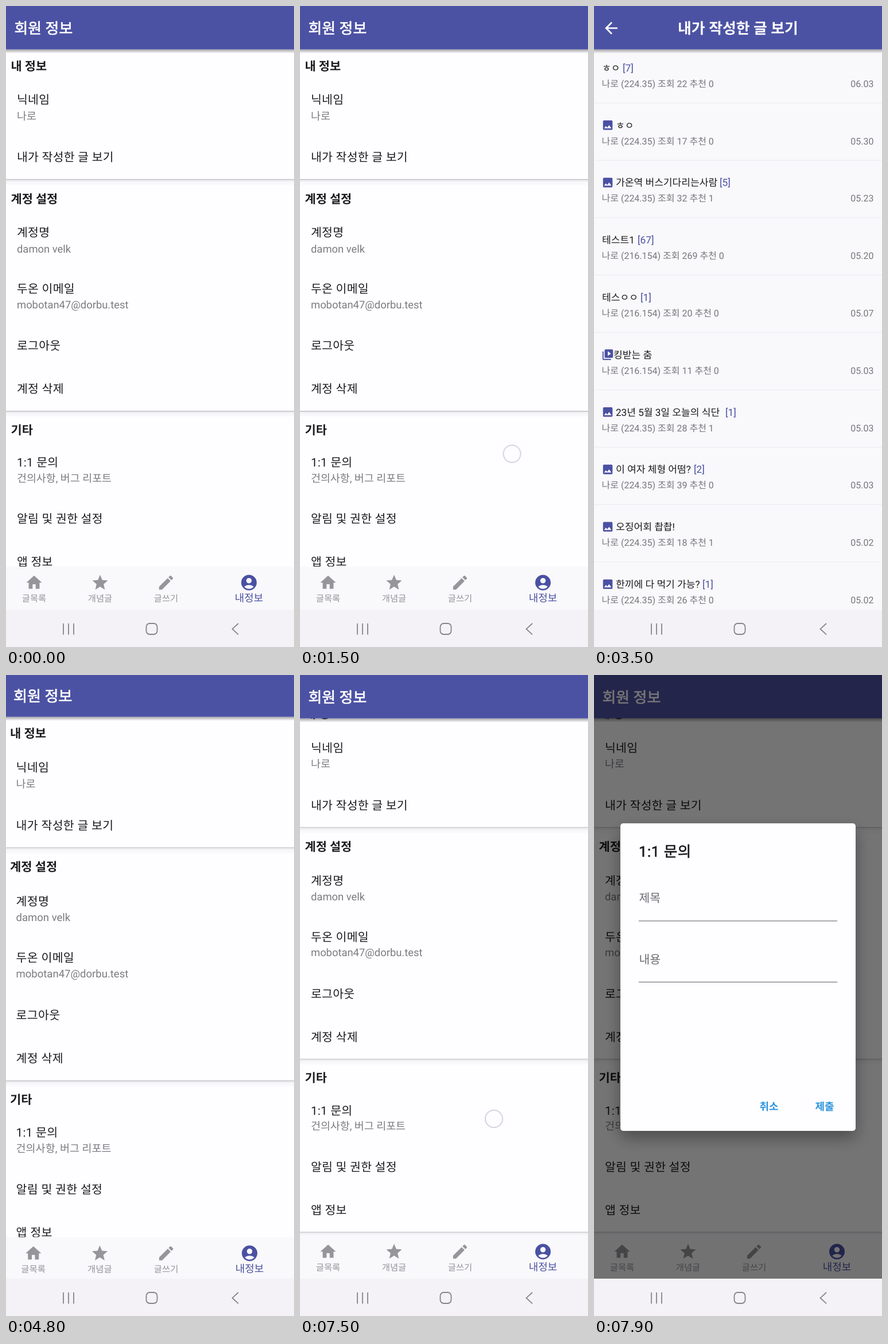
These frames come from a looping animation (502 px wide and 1115 px high, 8000 ms). An HTML page:

```html
<!DOCTYPE html>
<html lang="ko">
<head>
<meta charset="utf-8">
<title>회원 정보</title>
<style>
html, body { margin: 0; width: 100%; height: 100%; overflow: hidden; background: #f4f2f6; }
svg { display: block; width: 502px; height: 1115px; }
text { font-family: Roboto, "Noto Sans CJK KR", "Noto Sans CJK", sans-serif; fill: #1b1b1e; white-space: pre; text-rendering: geometricPrecision; }
.h { font-weight: 700; font-size: 20.8px; }
.t { font-size: 20.45px; letter-spacing: .3px; }
.s { font-size: 18.4px; fill: #7c7b80; }
.bar { font-size: 25.9px; fill: #fff; stroke: #fff; stroke-width: .7px; }
.row { font-size: 17.1px; }
.meta { font-size: 16px; fill: #77767b; }
.cnt { font-size: 17.3px; fill: #4a51a2; }
.tab { font-size: 15.4px; fill: #96959a; }
.on { font-size: 17.9px; fill: #4a51a2; }
.dt { font-size: 25.6px; letter-spacing: .6px; stroke: #1b1b1e; stroke-width: .6px; }
.lab { font-size: 20.4px; fill: #6b6b70; }
.btn { font-size: 17.9px; font-weight: 700; fill: #2b93dd; }
.bold { font-weight: 700; stroke: none; }
.mid { text-anchor: middle; }
.end { text-anchor: end; }

#home, #posts { transform-origin: 251px 525px; }
#list { animation: scroll 8s linear infinite; }
#home { animation: under 8s linear infinite; }
#posts { animation: fade 8s linear infinite, zoom 8s linear infinite; }
#dialog { animation: dialog 8s linear infinite; }
#touch { animation: show 8s step-end infinite, move 8s linear infinite; }

@keyframes scroll {
  0%, 9.75% { transform: translateY(0); }
  11.25% { transform: translateY(-32px); }
  12.5%, 15% { transform: translateY(-36.5px); }
  18.75%, 71.25% { transform: translateY(0); }
  75%, 100% { transform: translateY(-36.5px); }
}
@keyframes under {
  0%, 33.625% { transform: scale(1); }
  34.25% { transform: scale(1.02); animation-timing-function: cubic-bezier(.208, .82, .25, 1); }
  37.375%, 58.12% { transform: scale(1.05); }
  58.125% { transform: scale(1.1); }
  58.75% { transform: scale(1.06); animation-timing-function: cubic-bezier(.208, .82, .25, 1); }
  61.875%, 100% { transform: scale(1); }
}
@keyframes zoom {
  0%, 33.625% { transform: scale(.85); }
  34.25% { transform: scale(.91); animation-timing-function: cubic-bezier(.208, .82, .25, 1); }
  37.375%, 58.125% { transform: scale(1); }
  58.75% { transform: scale(.96); animation-timing-function: cubic-bezier(.208, .82, .25, 1); }
  61.875%, 100% { transform: scale(.9); }
}
@keyframes fade {
  0%, 34.09% { opacity: 0; }
  34.56%, 58.44% { opacity: 1; }
  58.91%, 100% { opacity: 0; }
}
@keyframes dialog {
  0%, 95.625% { opacity: 0; }
  98.125%, 100% { opacity: 1; }
}
@keyframes show {
  0% { opacity: 0; }
  7.5% { opacity: 1; }
  20% { opacity: 0; }
  30% { opacity: 1; }
  33.75% { opacity: 0; }
  55% { opacity: 1; }
  58.75% { opacity: 0; }
  70% { opacity: 1; }
  81.25% { opacity: 0; }
  93.75% { opacity: 1; }
  96.25%, 100% { opacity: 0; }
}
@keyframes move {
  0%, 7.5% { transform: translate(352px, 818px); }
  10% { transform: translate(352px, 805px); }
  11.25% { transform: translate(357px, 767px); }
  12.5% { transform: translate(360px, 730px); }
  15% { transform: translate(362px, 715px); }
  20% { transform: translate(372px, 800px); }
  20.1%, 40% { transform: translate(392px, 263px); }
  40.1%, 65% { transform: translate(30px, 39px); }
  65.1%, 70% { transform: translate(380px, 720px); }
  76.25%, 85% { transform: translate(387px, 599px); }
  85.1%, 100% { transform: translate(338px, 772px); }
}
</style>
</head>
<body>
<svg id="stage" viewBox="0 0 502 1115"></svg>
<script>
const ACCENT = '#4a51a2', GREY = '#96959a', PAPER = '#f9f8fb', CARD = '#fefdff';

const ICONS = {
  home: 'M10 20v-6h4v6h5v-8h3L12 3 2 12h3v8z',
  star: 'M12 17.27L18.18 21l-1.64-7.03L22 9.24l-7.19-.61L12 2 9.19 8.63 2 9.24l5.46 4.73L5.82 21z',
  pen: 'M3 17.25V21h3.75L17.81 9.94l-3.75-3.75zM20.71 7.04a1 1 0 0 0 0-1.41l-2.34-2.34a1 1 0 0 0-1.41 0l-1.83 1.83 3.75 3.75z',
  user: 'M12 2a10 10 0 1 0 0 20a10 10 0 1 0 0-20zm0 4a3.5 3.5 0 1 1 0 7a3.5 3.5 0 1 1 0-7zm0 14c-2.03 0-4.43-.82-6.14-2.88a9.95 9.95 0 0 1 12.28 0C16.43 19.18 14.03 20 12 20z',
  image: 'M21 19V5a2 2 0 0 0-2-2H5a2 2 0 0 0-2 2v14a2 2 0 0 0 2 2h14a2 2 0 0 0 2-2zM8.5 13.5l2.5 3.01L14.5 12l4.5 6H5z',
  video: 'M4 6H2v14a2 2 0 0 0 2 2h14v-2H4zm16-4H8a2 2 0 0 0-2 2v12a2 2 0 0 0 2 2h12a2 2 0 0 0 2-2V4a2 2 0 0 0-2-2zm-8 12.5v-9l6 4.5z',
  back: 'M20 11H7.83l5.59-5.59L12 4l-8 8 8 8 1.41-1.41L7.83 13H20z'
};

const SIZE = { h: 20.8, t: 20.45, s: 18.4, bar: 25.9, row: 17.1, meta: 16, cnt: 17.3, tab: 15.4, on: 17.9, dt: 25.6, lab: 20.4, btn: 17.9 };

// y is the optical middle of the line
const text = (cls, x, y, str) =>
  `<text class="${cls}" x="${x}" y="${y + SIZE[cls.split(' ')[0]] * .365}">${str}</text>`;
const rect = (x, y, w, h, fill, more = '') =>
  `<rect x="${x}" y="${y}" width="${w}" height="${h}" fill="${fill}" ${more}/>`;
const icon = (name, x, y, k, fill) =>
  `<path d="${ICONS[name]}" fill="${fill}" fill-rule="evenodd" transform="translate(${x} ${y}) scale(${k}) translate(-12 -12)"/>`;
const card = (top, bottom) =>
  rect(0, top, 502, bottom - top, CARD) + rect(0, bottom - 1, 502, 2, '#cdccd0') +
  rect(0, bottom + 1, 502, 3, '#f1f0f3');
const appBar = () => rect(0, 75.5, 502, 7, 'url(#shade)') + rect(0, 0, 502, 75.5, '#4c52a3');

const lines = [
  ['h', 104, '내 정보'], ['t', 163, '닉네임'], ['s', 191, '나로'], ['t', 263, '내가 작성한 글 보기'],
  ['h', 335, '계정 설정'], ['t', 394, '계정명'], ['s', 422, 'damon velk'],
  ['t', 492, '두온 이메일'], ['s', 519, 'mobotan47@dorbu.test'],
  ['t', 591, '로그아웃'], ['t', 666, '계정 삭제'],
  ['h', 737, '기타'], ['t', 794, '1:1 문의'], ['s', 821, '건의사항, 버그 리포트'],
  ['t', 892, '알림 및 권한 설정'], ['t', 967, '앱 정보']
];
const tabs = [['home', 49, '글목록'], ['star', 164, '개념글'], ['pen', 279, '글쓰기'], ['user', 423.5, '내정보']];

const home = `<g id="home">${rect(0, 0, 502, 1050, PAPER)}
  <g id="list">${card(76, 302)}${card(311, 705)}${card(714, 1006)}
  ${lines.map(([c, y, s]) => text(c, c === 'h' ? 8.5 : 19, y, s)).join('')}</g>
  ${rect(0, 975, 502, 76, PAPER)}
  ${tabs.map(([name, x, label]) => {
    const on = name === 'user';
    return icon(name, x, 1003, 1.35, on ? ACCENT : GREY) + text((on ? 'on' : 'tab') + ' mid', x, on ? 1029 : 1030, label);
  }).join('')}
  ${appBar()}${text('bar', 14.5, 39, '회원 정보')}</g>`;

// title, comments, x of comments, network, views, likes, date, icon
const A = '224.35', B = '216.154';
const posts = [
  ['ㅎㅇ', 7, 50, A, 22, 0, '06.03'],
  ['ㅎㅇ', 0, 0, A, 17, 0, '05.30', 'image'],
  ['가온역 버스기다리는사람', 5, 219, A, 32, 1, '05.23', 'image'],
  ['테스트1', 67, 76, B, 269, 0, '05.20'],
  ['테스ㅇㅇ', 1, 81, B, 20, 0, '05.07'],
  ['킹받는 춤', 0, 0, B, 11, 0, '05.03', 'video'],
  ['23년 5월 3일 오늘의 식단', 1, 229, A, 28, 1, '05.03', 'image'],
  ['이 여자 체형 어떰?', 2, 174, A, 39, 0, '05.03', 'image'],
  ['오징어회 촵촵!', 0, 0, A, 18, 1, '05.02', 'image'],
  ['한끼에 다 먹기 가능?', 1, 189, A, 26, 0, '05.02', 'image']
];
const post = ([title, count, cx, net, views, likes, date, pic], i) => {
  const y = 107.5 + 99.8 * i;
  const x = pic === 'video' ? 34 : pic ? 38 : 14;
  return (pic ? icon(pic, 24, y, .92, ACCENT) : '') + text('row', x, y, title) +
    (count ? text('cnt', cx, y, `[${count}]`) : '') +
    text('meta', 13.5, y + 27.5, `나로 (${net}) 조회 ${views} 추천 ${likes}`) +
    text('meta end', 487.5, y + 27.5, date) +
    rect(0, y + 60.5, 502, 1.3, '#eeedf1');
};
const postPage = `<g id="posts">${rect(0, 0, 502, 1050, PAPER)}${posts.map(post).join('')}
  ${appBar()}${icon('back', 30, 38.5, 1.36, '#fff')}${text('bar mid bold', 251, 39, '내가 작성한 글 보기')}</g>`;

const dialog = `<g id="dialog">${rect(0, 0, 502, 1050, '#000', 'opacity=".54"')}
  ${rect(46, 258, 410, 535, CARD, 'rx="5" style="filter:drop-shadow(0 12px 14px rgba(0,0,0,.35))"')}
  ${text('dt', 78, 307, '1:1 문의')}
  ${text('lab', 78.5, 388, '제목')}${rect(78, 427, 346, 1.5, '#8f8f93')}
  ${text('lab', 78.5, 495, '내용')}${rect(78, 533.5, 346, 1.5, '#8f8f93')}
  ${text('btn mid', 305, 750, '취소')}${text('btn mid', 402, 750, '제출')}</g>`;

const systemBar = `${rect(0, 1050, 502, 65, '#f4f2f6')}
  <g fill="none" stroke="#858489" stroke-width="1.8">
  <path d="M100 1074v19.5M109 1074v19.5M118 1074v19.5M405 1074l-10.5 9.7 10.5 9.7"/>
  <rect x="244.5" y="1074" width="19" height="19" rx="6"/></g>`;

document.getElementById('stage').innerHTML = `<defs>
  <linearGradient id="shade" x2="0" y2="1"><stop stop-color="#000" stop-opacity=".34"/>
  <stop offset="1" stop-color="#000" stop-opacity="0"/></linearGradient>
  <clipPath id="app"><rect width="502" height="1050"/></clipPath></defs>
  <g clip-path="url(#app)">${home}${postPage}${dialog}</g>${systemBar}
  <g id="touch"><circle r="15" fill="#fff" fill-opacity=".3" stroke="#d3d3e2" stroke-width="2"/></g>`;

const anims = document.getAnimations();
anims.forEach(a => a.pause());
const start = performance.now();
function tick() {
  const t = (performance.now() - start) % 8000;
  const held = Math.floor(t / 100) * 100 + 1;
  anims.forEach(a => { a.currentTime = held; });
  requestAnimationFrame(tick);
}
tick();
</script>
</body>
</html>
```
